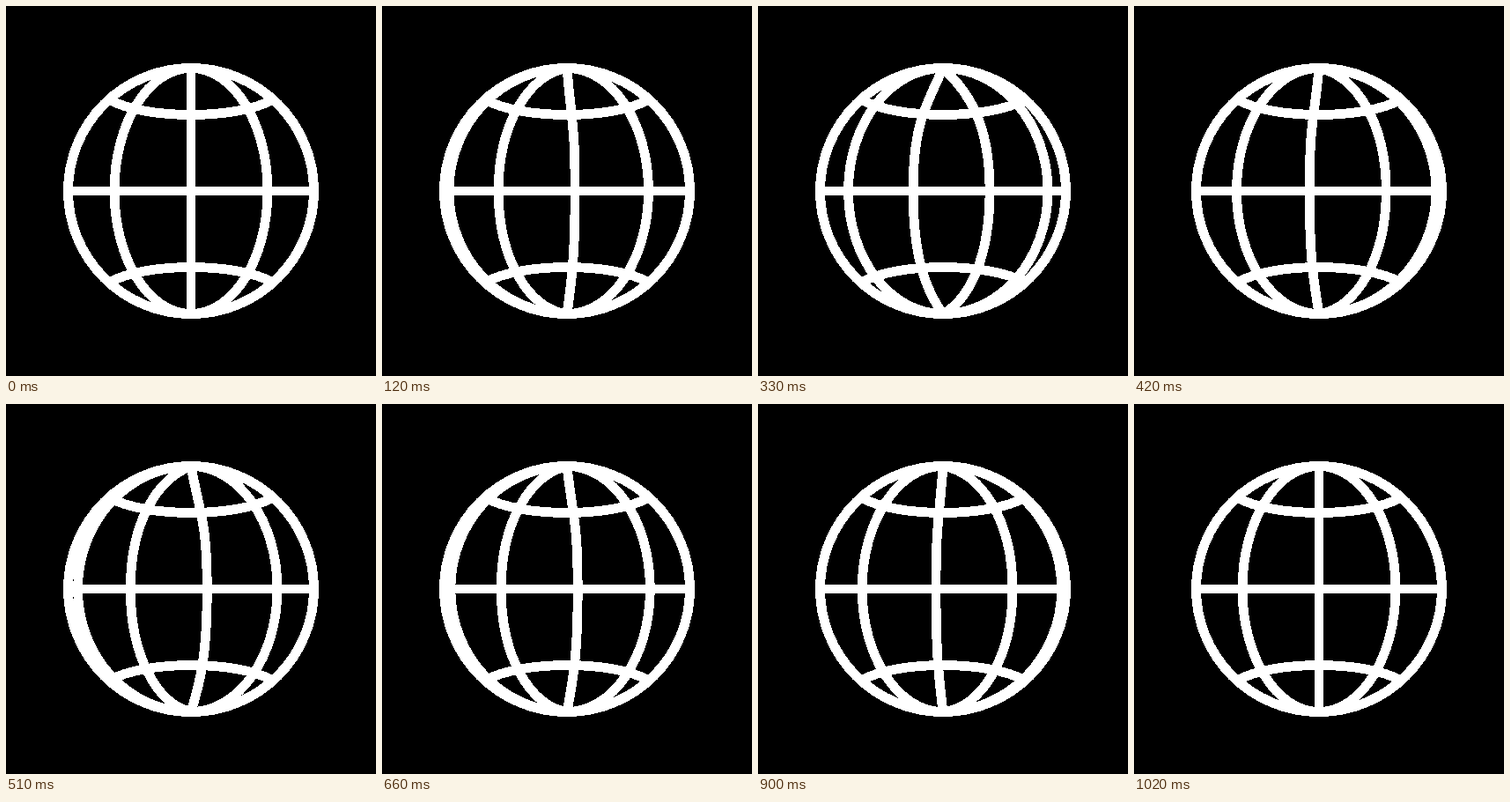
Write an HTML page that moves like this. It is 420x420 px and loops after 1.11 s.

```html
<!DOCTYPE html>
<html lang="en">
<head>
<meta charset="utf-8">
<title>Spinning globe</title>
<style>
  html, body { margin: 0; width: 100%; height: 100%; overflow: hidden; background: #000; }
  svg { display: block; width: 100vw; height: 100vh; }
</style>
</head>
<body>
<svg viewBox="-210 -210 420 420" fill="none" stroke="#fff" stroke-width="10.8" shape-rendering="crispEdges">
  <circle r="139.5" stroke-width="11"/>
  <path d="M-139.5 0H139.5" stroke-width="10"/>
  <path d="M-93 -104C-53 -80.7 53 -80.7 93 -104M-93 104C-53 80.7 53 80.7 93 104"/>
  <path id="meridians"/>
</svg>
<script>
const LOOP = 1110, STEP = 30, RADIUS = 139.5, INNER = 87;
const ROUND = 0.5523; // handle length of a quarter ellipse
const stops = [-RADIUS, -INNER, 0, INNER, RADIUS];
const meridians = document.getElementById('meridians');

// time (ms), meridian shifts so far, shifts per second
const knots = [
  [0, 0, 0], [210, 0.275, 2.1], [330, 0.61, 3.1], [510, 1.21, 4.6],
  [660, 2.14, 5.1], [780, 2.63, 3.1], [1020, 3, 0]
];

// Cubic Hermite curve: slow start, fast middle, soft landing.
function turn(time) {
  const i = knots.findIndex(k => k[0] > time);
  if (i < 0) return 3;
  const [t0, y0, v0] = knots[i - 1], [t1, y1, v1] = knots[i];
  const span = (t1 - t0) / 1000, u = (time - t0) / (t1 - t0), w = 1 - u;
  return y0 * w * w * (1 + 2 * u) + y1 * u * u * (3 - 2 * u)
    + span * u * w * (v0 * w - v1 * u);
}

// A half ellipse whose poles sharpen as it nears the straight middle line.
function meridian(x) {
  const sharp = Math.max(0, 1 - Math.abs(x) / INNER);
  const top = -RADIUS * (1 - 0.5 * sharp), bottom = RADIUS * (1 - 0.3 * sharp);
  const side = RADIUS * ROUND, pole = x * ROUND;
  return `M0 ${-RADIUS}C${pole} ${top} ${x} ${-side} ${x} 0`
    + `C${x} ${side} ${pole} ${bottom} 0 ${RADIUS}`;
}

function draw(time) {
  const part = turn(time) % 1;
  meridians.setAttribute('d', stops.slice(0, -1)
    .map((x, i) => meridian(x + (stops[i + 1] - x) * part)).join(''));
}

const start = performance.now();
function tick() {
  const time = (performance.now() - start) % LOOP;
  draw(Math.floor(time / STEP) * STEP);
  requestAnimationFrame(tick);
}
draw(0);
requestAnimationFrame(tick);
</script>
</body>
</html>
```
